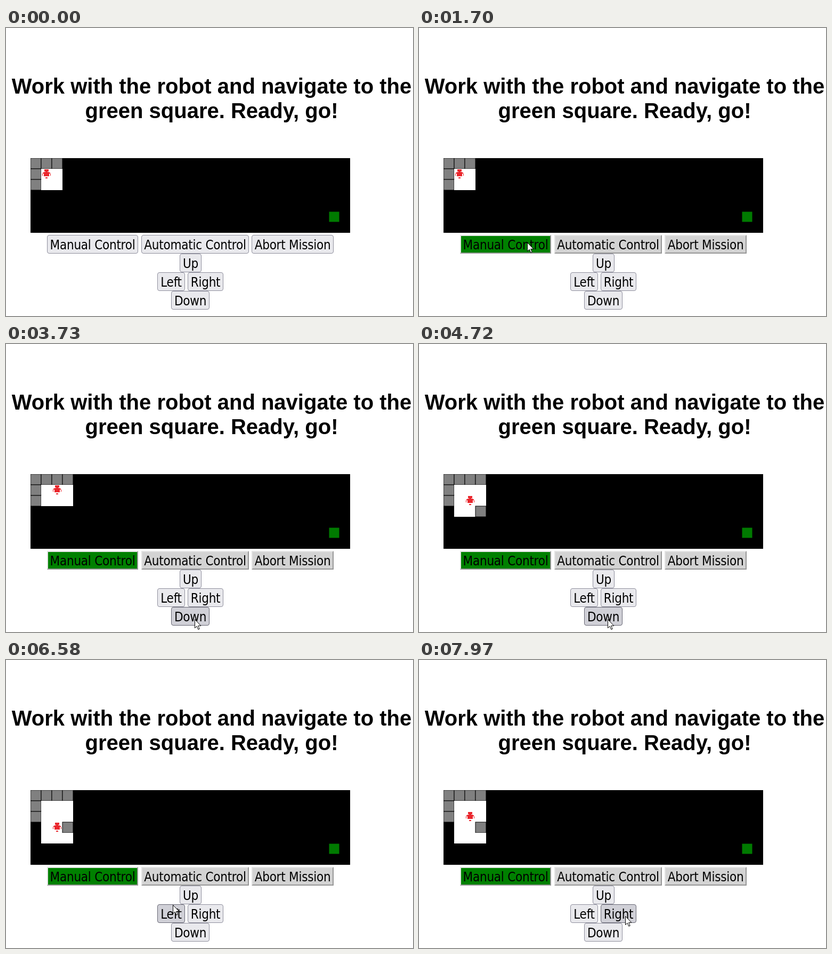
Recreate the animation shown at these times as an HTML page with a canvas. Size 764 by 540 pixels, loop 8 s.

```html
<!DOCTYPE html>
<html lang="en">
<head>
<meta charset="utf-8">
<title>Robot navigation</title>
<style>
  html, body { margin: 0; width: 100%; height: 100%; overflow: hidden; background: #fff; }
  #stage { position: relative; width: 764px; height: 540px; overflow: hidden; color: #000; }
  canvas, #pointer { position: absolute; left: 0; top: 0; }
  h1 {
    position: absolute; left: 8px; top: 86px; width: 756px; margin: 0;
    font: bold 40px/46px "Liberation Sans", Arial, sans-serif;
    text-align: center; white-space: nowrap;
  }
  .label {
    position: absolute; text-align: center; white-space: nowrap;
    font: 24px/38px "DejaVu Sans Condensed", Roboto, sans-serif; letter-spacing: -0.25px;
  }
</style>
</head>
<body>
<div id="stage">
  <canvas id="scene" width="764" height="540"></canvas>
  <h1>Work with the robot and navigate to the<br>green square. Ready, go!</h1>
  <svg id="pointer" width="14" height="22" viewBox="0 0 14 22">
    <path d="M.5 .5V16.5L4.2 13.2L6.8 19.2L9.2 18.2L6.7 12.3H11.8Z" fill="#fff" stroke="#000"/>
  </svg>
</div>
<script>
const LOOP = 8000, STEP = 75, HOLD = 80, MODE_SET = 1700;
const CELL = 20, MAZE = { x: 46, y: 244, w: 600, h: 140 };
const stage = document.getElementById('stage');
const pointer = document.getElementById('pointer');
const ctx = document.getElementById('scene').getContext('2d');

// rows of buttons: label and width
const rows = [
  [['Manual Control', 171], ['Automatic Control', 202], ['Abort Mission', 154]],
  [['Up', 41]],
  [['Left', 52], ['Right', 67]],
  [['Down', 72]]
];

// pointer strokes: first step, last step, end point
const strokes = [
  [70, 70, 629, 469],
  [150, 460, 274, 410],
  [540, 610, 203, 402],
  [2020, 2310, 399, 487],
  [2480, 2630, 372, 484],
  [2940, 3090, 354, 516],
  [5820, 5890, 345, 506],
  [6040, 6210, 307, 463],
  [6580, 6970, 342, 440],
  [7660, 7660, 350, 455],
  [7810, 7970, 387, 480]
];
const presses = [1540, 2710, 4020, 5030, 7120];

// time, column, row of the robot
const route = [[0, 1, 1], [3730, 2, 1], [4720, 2, 2], [5750, 2, 3], [7580, 2, 2]];

// robot halves, mirrored about the cell centre: top, height, inner and outer distance
const robot = {
  head: [1, 4, 0, 4], neck: [5, 1, 0, 2], body: [6, 8, 0, 5],
  shoulder: [7, 2, 5, 7], arm: [9, 4, 7, 8], wheel: [16, 2, 0, 2]
};

// each row is centred under the maze
function layOut() {
  const gap = 5.5, h = 35;
  return rows.flatMap((row, i) => {
    const total = row.reduce((sum, [, w]) => sum + w + gap, -gap);
    let left = MAZE.x + (MAZE.w - total) / 2;
    return row.map(([text, w]) => {
      const b = { text, x: Math.round(left), y: 388 + i * h, w, h, mode: i === 0 };
      left += w + gap;
      return b;
    });
  });
}

const buttons = layOut();
for (const b of buttons) {
  const el = document.createElement('div');
  el.className = 'label';
  el.textContent = b.text;
  el.style.cssText = `left:${b.x}px;top:${b.y}px;width:${b.w}px`;
  stage.insertBefore(el, pointer);
}

function rect(color, x, y, w, h) {
  ctx.fillStyle = color;
  ctx.fillRect(x, y, w, h);
}

// the pointer jumps along each stroke in even steps
function pointerAt(t) {
  let pos = null;
  for (const [from, to, x, y] of strokes) {
    if (t < from) break;
    const gaps = Math.round((to - from) / STEP);
    const done = Math.floor((t - from + 1) / ((to - from) / gaps || 1));
    const k = Math.min(1, (done + 1) / (gaps + 1));
    const start = pos || { x, y };
    pos = { x: start.x + (x - start.x) * k, y: start.y + (y - start.y) * k };
  }
  return pos && { x: Math.round(pos.x), y: Math.round(pos.y) };
}

function drawBlock(color, col, row) {
  const x = MAZE.x + col * CELL, y = MAZE.y + row * CELL;
  rect(color, x, y, CELL, CELL);
  ctx.strokeStyle = '#000';
  ctx.lineWidth = 1;
  ctx.strokeRect(x, y, CELL, CELL);
}

function drawRobot(col, row) {
  const cx = MAZE.x + (col + 0.5) * CELL, y = MAZE.y + row * CELL;
  for (const [top, h, inner, outer] of Object.values(robot)) {
    rect('#ea272d', cx + inner, y + top, outer - inner, h);
    rect('#ea272d', cx - outer, y + top, outer - inner, h);
  }
}

// the robot reveals every cell next to its path
function drawMaze(t) {
  const visited = route.filter(([at]) => t >= at);
  const [, col, row] = visited[visited.length - 1];
  const seen = (c, r) => visited.some(([, x, y]) => Math.abs(c - x) < 2 && Math.abs(r - y) < 2);
  ctx.save();
  ctx.beginPath();
  ctx.rect(MAZE.x, MAZE.y, MAZE.w, MAZE.h);
  ctx.clip();
  rect('#000', MAZE.x, MAZE.y, MAZE.w, MAZE.h);
  for (let r = 0; r < 5; r++) {
    for (let c = 0; c < 4; c++) {
      if (!seen(c, r)) continue;
      const wall = r === 0 || c === 0 || (c === 3 && r === 3);
      if (wall) drawBlock('#808080', c, r);
      else rect('#fff', MAZE.x + c * CELL, MAZE.y + r * CELL, CELL, CELL);
    }
  }
  drawBlock('#007a00', 28, 5);
  drawRobot(col, row);
  ctx.restore();
}

function drawModeButton({ x, y, w, h }, chosen) {
  rect('#e3e3e3', x, y, w, h);
  ctx.fillStyle = '#979797';
  ctx.beginPath();
  ctx.moveTo(x + w, y);
  ctx.lineTo(x + w, y + h);
  ctx.lineTo(x, y + h);
  ctx.lineTo(x + 2, y + h - 2);
  ctx.lineTo(x + w - 2, y + 2);
  ctx.fill();
  rect(chosen ? '#008000' : '#d3d3d3', x + 2, y + 2, w - 4, h - 4);
}

function drawButton({ x, y, w, h }, pos, pressed) {
  const over = pos && pos.x >= x && pos.x < x + w && pos.y >= y && pos.y < y + h;
  const [fill, line] = !over ? ['#e9e9ed', '#8f8f9d']
    : pressed ? ['#b1b1b9', '#484851'] : ['#d0d0d7', '#676774'];
  ctx.fillStyle = fill;
  ctx.strokeStyle = line;
  ctx.lineWidth = 1;
  ctx.beginPath();
  ctx.roundRect(x + 0.5, y + 0.5, w - 1, h - 1, 3.5);
  ctx.fill();
  ctx.stroke();
}

function draw(t) {
  const pos = pointerAt(t);
  const pressed = presses.some(at => t >= at && t < at + HOLD);
  rect('#fff', 0, 0, 764, 540);
  drawMaze(t);
  for (const b of buttons) {
    if (b.mode && t >= MODE_SET) drawModeButton(b, b === buttons[0]);
    else drawButton(b, pos, pressed);
  }
  pointer.style.visibility = pos ? 'visible' : 'hidden';
  if (pos) pointer.style.transform = `translate(${pos.x}px, ${pos.y}px)`;
}

const began = performance.now();
function tick() {
  draw((performance.now() - began) % LOOP);
  requestAnimationFrame(tick);
}
tick();
</script>
</body>
</html>
```
